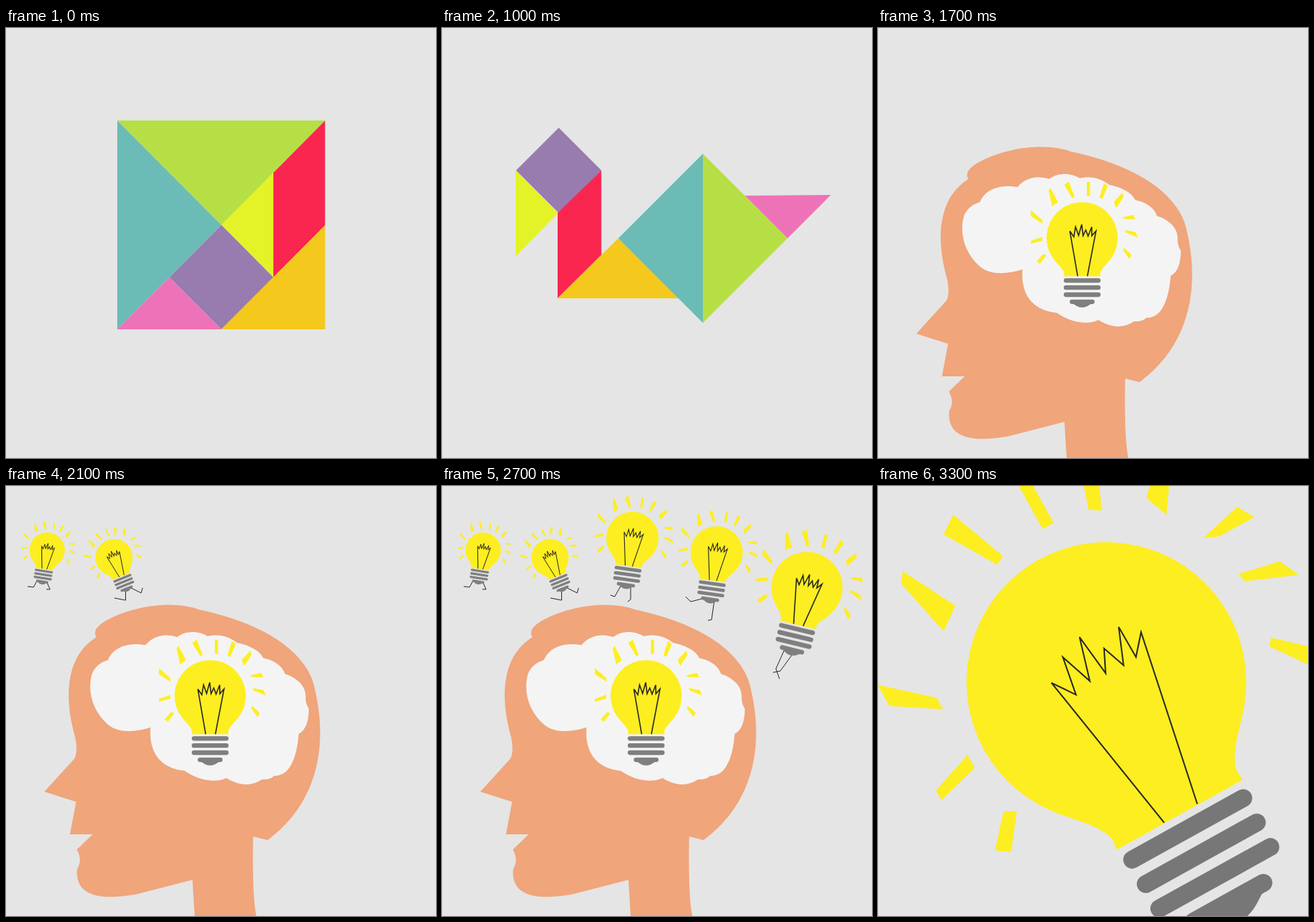
Write an HTML page that moves like this. It is 595 px wide and 595 px high and loops after 3.8 s.

```html
<!DOCTYPE html>
<html lang="en">
<head>
<meta charset="utf-8">
<title>Ideas</title>
<style>
  html, body { margin: 0; width: 100%; height: 100%; overflow: hidden; background: #e5e5e5; }
  svg { display: block; width: 100vw; height: 100vh; }
  .glow { fill: #fdee21; }
  .cap { fill: #7f7f7f; stroke: #7f7f7f; }
  .giant .cap { fill: #777; stroke: #777; }
  .wire { fill: none; stroke: #2a2722; vector-effect: non-scaling-stroke; }
</style>
</head>
<body>
<svg id="stage" viewBox="0 0 595 595">
  <g id="head">
    <path fill="#f0a57b" d="M125 209C123 206 123 203 124 200C130 182 210 151 267 171C340 186 418 222 428 284
      C442 345 440 432 362 490L342 485C341 530 342 575 346.500 595H261L258 545L180 565C130 574 95 567 98.500 530
      C104 521 103 512 98 503L120 482H88.500L97 437L53 423L94 378C99 372 98 357 95 345C84 306 76 240 125 209Z"/>
    <path fill="#f4f4f4" d="M141 241C150 219 175 217 193 220C205 206 222 204 237 209C249 199 268 201 279 208
      C294 204 308 208 320 217C334 220 350 226 356 238C370 241 382 248 386 260C402 265 416 277 414.500 293
      C415 300 416 303 419 308C419 325 415 338 405 343C403 370 395 402 371 401C366 406 360 406 354 406
      C338 417 321 414 305 404C288 412 266 407 247 394C215 391 197 370 200 334C178 341 155 342 141 330
      C120 312 112 284 119 260C123 250 131 244 141 241Z"/>
  </g>
</svg>
<script>
const LOOP = 3800;
const NS = 'http://www.w3.org/2000/svg';
const stage = document.getElementById('stage');
const head = document.getElementById('head');
const scenes = [];

function add(parent, tag, attrs) {
  const el = document.createElementNS(NS, tag);
  for (const key in attrs) el.setAttribute(key, attrs[key]);
  return parent.appendChild(el);
}

function show(el, from, to) {
  scenes.push({ el, from, to });
}

// Tangram poses, pieces listed back to front
const colors = ['#e4f328', '#987caf', '#f92650', '#f4c81c', '#6bbbb7', '#ee72b7', '#b6df45'];
const poses = [
  ['298 272.5 370 200 370 345', '298 272.5 370 345 298 417 226 345', '370 200 441.5 128 441.5 273 370 345',
   '298 417 441.5 273 441.5 417', '154 128 298 272.5 154 417', '154 417 226 345 298 417', '154 128 441.5 128 298 272.5'],
  ['148 142 231 183 190 266', '184 216 271 248 239.5 335 152 303', '130 230 234.5 309 248 403 144 324',
   '174 322 267 229 360 322', '270.5 126 447 182 215 301', '359 177 403 301 318 260', '267 339 523 289 420 442'],
  ['102 197 160.5 256 102 316', '161.5 138 220.5 197 161.5 256 102.5 197', '160 256 220.5 197 220.5 314 160 374',
   '160 374 244 291 328 374', '361 174 361 408 244 291', '419 232 538 231 478 291', '361 174 478 291 361 408'],
];
poses.forEach((pose, i) => {
  const group = add(stage, 'g', {});
  pose.forEach((points, k) => add(group, 'polygon', { points, fill: colors[k] }));
  show(group, i * 500, i * 500 + 500);
});

show(head, 1500, 3300);

// Bulb around the centre of its glass, radius 50
const glass = 'M-25.700 54.200C-25.700 51-24.500 50.500-27 46C-30 40.500-36.500 35-40 30A50 50 0 1 1 40 30' +
  'C36.500 35 30 40.500 27 46C24.500 50.500 25.700 51 25.700 54.200Z';
const bars = 'M-22.700 60H22.700M-22.700 70H22.700M-22.700 80H22.700M-14.300 90H14.300';
const tip = 'M-13 92.500C-9 95-6 98 0 98S9 95 13 92.500Z';
const filament = '-6.300 54 -17.300 -9.300 -11.700 -1.300 -9.300 -15.300 -5 -3.200 -.6 -18.700 1.300 -2.900 ' +
  '5.100 -10.900 8.300 -2.300 13.400 -15.100 13.600 -2.700 19.500 -9.600 7.300 53.900';
const rays = [
  '-64 33.3 -54.5 22.6 -50.4 24.9 -59.3 36.7', '-72 4.3 -56 -1.3 -56 4 -72 8.3',
  '-72 -38.8 -55.8 -24.5 -55.8 -19.8 -72 -30.2', '-44.5 -70 -34 -50 -42.1 -44.1 -47.1 -66.4',
  '-18.9 -78.9 -10.5 -57.3 -13.8 -55.6 -25.3 -74.4', '6.6 -78.5 11.1 -78.5 11.1 -58.9 6.6 -58.9',
  '30.5 -76.5 36 -72.5 28.3 -54.4 24.3 -56.9', '56.5 -63.5 58 -57 47.8 -41.9 44.4 -50.5',
  '71.3 -32.1 74.9 -25.9 60.5 -26 55.3 -28.2', '60 -10.9 75.2 -7.7 78.7 -.2 60.8 -7.5',
  '59.2 14.7 69.5 24 66.5 30 57.1 17.1',
];

function bulb(x, y, turn, scale, line, legs = []) {
  const group = add(stage, 'g', {});
  legs.forEach(points => add(group, 'polyline', { points, class: 'wire', 'stroke-width': 1 }));
  const body = add(group, 'g', { transform: `translate(${x} ${y}) rotate(${turn}) scale(${scale})` });
  rays.forEach(points => add(body, 'polygon', { points, class: 'glow' }));
  add(body, 'path', { d: glass, class: 'glow' });
  add(body, 'path', { d: bars, class: 'cap', 'stroke-width': 6.4, 'stroke-linecap': 'round' });
  add(body, 'path', { d: tip, class: 'cap', 'stroke-width': 0 });
  add(body, 'polyline', { points: filament, class: 'wire', 'stroke-width': line });
  return group;
}

// Every 200 ms one more bulb appears
const crowd = [
  [282.5, 290.2, 0, .985, 1.6],
  [57, 88.7, 9, .49, 1, ['43 131 38 140 30 139', '56 132 61 143 56 143']],
  [149.5, 99, -22, .515, 1, ['165.5 145 165.5 158 150 155', '173 141 187 148 189 141']],
  [263.5, 72, 8, .725, 1.1, ['248 137 239 153 233 151', '261 139 261 157 257 160']],
  [380, 92, 8, .725, 1.1, ['364 155 344 160 337 153', '377 157 373 185 368 186']],
  [505, 140.5, 13.5, .985, 1.6, ['474 226 462 253 467 267', '487 230 468 256 458 258']],
  [523, 337, 10, .92, 1.5, ['499 424 489 443 494 453', '512 426 500 446 490 448']],
  [455, 502, 8, .78, 1.2, ['436 574 428 590 421 588', '449 576 449 591 445 594']],
];
crowd.forEach((args, i) => show(bulb(...args), 1700 + i * 200, 3300));

const giant = bulb(316, 271.3, -29, 3.87, 2);
giant.classList.add('giant');
show(giant, 3300, LOOP);

const start = performance.now();
function frame() {
  const t = (performance.now() - start) % LOOP;
  for (const { el, from, to } of scenes) {
    el.style.display = t >= from && t < to ? '' : 'none';
  }
  requestAnimationFrame(frame);
}
frame();
</script>
</body>
</html>
```
